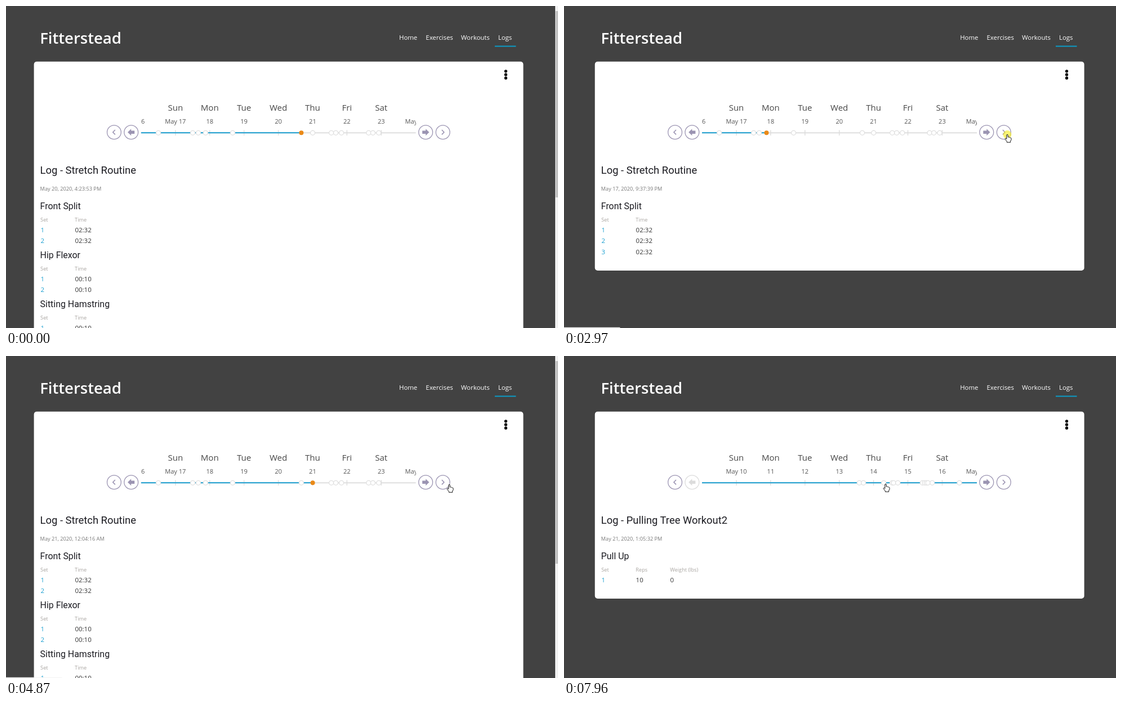
An HTML page that plays this animation: 980 by 572 pixels, repeating every 8 s.

```html
<!DOCTYPE html>
<html lang="en">
<head>
<meta charset="utf-8">
<title>Workout logs</title>
<style>
html, body { margin: 0; width: 100%; height: 100%; overflow: hidden; background: #424242; }
svg { display: block; width: 980px; height: 572px; }
text { font: 11.5px "Open Sans", "Noto Sans", sans-serif; fill: #333; }
.brand { font-size: 27.5px; font-weight: 600; fill: #fff; }
.nav { font-size: 11.4px; font-weight: 500; fill: #fff; }
.day { font-size: 15px; fill: #484848; text-anchor: middle; }
.date { font-size: 11px; fill: #555; text-anchor: middle; }
.title { font: 18.4px Roboto, sans-serif; fill: #1c1c22; }
.exercise { font: 15.9px Roboto, sans-serif; fill: #1c1c22; }
.stamp { font-size: 9.2px; fill: #777; }
.head { font-size: 9.2px; fill: #a8a4a0; }
.set { fill: #1b9fd0; }
</style>
</head>
<body>
<svg viewBox="0 0 980 572">
  <defs><clipPath id="window"><rect x="245" y="190" width="488" height="50"/></clipPath></defs>
  <rect width="980" height="572" fill="#424242"/>
  <g id="page">
    <rect id="card" x="54.8" y="98.75" width="868.8" rx="5" fill="#fff"/>
    <text class="brand" x="65.4" y="67">Fitterstead</text>
    <g id="nav"></g>
    <rect x="873" y="70.5" width="37.5" height="2" fill="#0b9cc8"/>
    <g id="kebab"></g>
    <g id="days"></g>
    <g clip-path="url(#window)">
      <rect x="245" y="224.3" width="488" height="2" fill="#dfdfdf"/>
      <g id="ticks"></g>
      <g id="strip">
        <rect id="fill" x="-300" y="224.2" height="2" fill="#1b9fd0"/>
      </g>
    </g>
    <g id="buttons"></g>
    <g id="logs"></g>
  </g>
  <g id="scrollbar">
    <rect x="975" width="5" height="572" fill="#f1f1f1"/>
    <rect id="thumb" x="975.6" y="9" width="5" fill="#c1c1c1"/>
  </g>
  <rect id="status" y="570.8" width="99.5" height="1.2" fill="#f4f4f4"/>
  <circle id="click" r="7.4" fill="#f5ec2a" opacity=".65"/>
  <g id="cursor" stroke="#111" fill="#fff" stroke-linejoin="round">
    <path id="arrow" stroke-width=".8" d="M0 0V12L2.8 9.5L4.6 13.7L6.5 12.9L4.7 8.8H8.4Z"/>
    <path id="hand" stroke-width="1" d="M-1.2 1Q0-.4 1.2 1V5Q2.6 4.3 3.4 5.4Q4.8 4.9 5.4 6Q6.9 5.8 7 7.3V9.6L5.6 12.2V14.2H-.7V12.7L-3.9 8.6Q-3.9 6.8-2.4 7.3L-1.2 8.4Z"/>
  </g>
</svg>
<script>
const LOOP = 8000, DAY = 60.9, SUNDAY = 306, NARROW_SHIFT = -5.2;
const $ = id => document.getElementById(id);

function add(parent, tag, attrs, content = '') {
  const el = document.createElementNS('http://www.w3.org/2000/svg', tag);
  for (const key in attrs) el.setAttribute(key, attrs[key]);
  el.textContent = content;
  parent.append(el);
  return el;
}
const label = (parent, cls, x, y, content) => add(parent, 'text', { class: cls, x, y }, content);
const show = (el, on) => el.setAttribute('visibility', on ? 'visible' : 'hidden');
const move = (el, x, y = 0) => el.setAttribute('transform', `translate(${x} ${y})`);

// Fixed page furniture
[['Home', 703.2], ['Exercises', 750.5], ['Workouts', 813], ['Logs', 879]]
  .forEach(([name, x]) => label($('nav'), 'nav', x, 60, name));
[115.8, 121.9, 128].forEach(cy => add($('kebab'), 'circle', { cx: 892.5, cy, r: 2.65 }));
['Sun', 'Mon', 'Tue', 'Wed', 'Thu', 'Fri', 'Sat'].forEach((name, i) => {
  const x = SUNDAY + i * DAY;
  label($('days'), 'day', x, 185.5, name);
  add($('ticks'), 'rect', { x: x - .7, y: 220.5, width: 1.4, height: 9.5, fill: '#dcdcdc' });
});

function button(x, flip, fat) {
  const g = add($('buttons'), 'g', { transform: `translate(${x} 224.2) scale(${flip} 1)`, stroke: '#9b94b2', fill: '#9b94b2' });
  add(g, 'circle', { r: 12.4, fill: 'none', 'stroke-width': 1.3 });
  add(g, 'path', fat
    ? { d: 'M-6.2 0L0-6V-2.8H6V2.8H0V6Z', stroke: 'none' }
    : { d: 'M1.9-4.2L-2.1 0L1.9 4.2', fill: 'none', 'stroke-width': 1.6 });
  return g;
}
button(197.1, 1, false);
const previous = button(227.4, 1, true);
button(750.3, -1, true);
button(780.8, -1, false);

// Sliding strip of dates and log dots
for (let d = 10; d <= 24; d++)
  label($('strip'), 'date', SUNDAY + (d - 17) * DAY, 209, d % 7 === 3 ? 'May ' + d : d);
const recent = [275.7, 336.7, 346.6, 359.5, 407.6, 529.5, 549.7, 582.7, 590.7, 600.7, 649, 656.6, 667];
const older = [98, 105.3, 141.3, 156.4, 158.8, 166.4, 210, 213.8, 217, 219.8, 227.4];
const [, dots] = [older, recent].map(list =>
  list.map(cx => add($('strip'), 'circle', { cx, cy: 225.3, r: 4, fill: '#fff', stroke: '#dfdfdf', 'stroke-width': 1.3 })));

// Log panels
const timed = (name, time, count) => ({ name, heads: ['Time'], rows: Array(count).fill([time]) });
const pullUp = { name: 'Pull Up', heads: ['Reps', 'Weight (lbs)'], rows: [['10', '0']] };
const stretch = [timed('Front Split', '02:32', 2), timed('Hip Flexor', '00:10', 2), timed('Sitting Hamstring', '00:10', 2)];

function makeLog(name, stamp, exercises, thumb = 0) {
  const g = add($('logs'), 'g', {});
  label(g, 'title', 65.8, 298.3, 'Log - ' + name);
  label(g, 'stamp', 65.8, 327.5, stamp);
  let y = 355.3;
  for (const { name, heads, rows } of exercises) {
    label(g, 'exercise', 65.8, y + 5.8, name);
    ['Set', ...heads].forEach((h, i) => label(g, 'head', 66.3 + i * 61, y + 27.7, h));
    rows.forEach((row, r) => [r + 1, ...row].forEach((v, i) =>
      label(g, i ? 'value' : 'set', 66.6 + i * 61, y + 46.6 + r * 19.5, v)));
    y += 48 + rows.length * 19.5;
  }
  return { g, thumb, bottom: thumb ? 600 : y + 8.2 };
}
const splitLog = makeLog('Stretch Routine', 'May 17, 2020, 9:37:39 PM', [timed('Front Split', '02:32', 3)]);
const mondayLog = makeLog('Pulling Tree Workout2', 'May 18, 2020, 3:58:21 PM', [pullUp]);
const stretchLog = makeLog('Stretch Routine', 'May 20, 2020, 4:23:53 PM', stretch, 331);
const nightLog = makeLog('Stretch Routine', 'May 21, 2020, 12:04:16 AM', stretch, 360);
const pullLog = makeLog('Pulling Tree Workout2', 'May 21, 2020, 1:05:32 PM', [pullUp]);
const logs = [splitLog, mondayLog, stretchLog, nightLog, pullLog];

// [start, selected dot, log]
const selections = [
  [-1000, 5, stretchLog], [1630, 3, splitLog], [3110, 4, mondayLog],
  [3820, 5, stretchLog], [4530, 6, nightLog], [5245, 7, pullLog]
];
const clicks = [[1480, 1560], [2890, 3120], [3680, 3840], [4390, 4550], [5180, 5260], [6440, 6520]];
const statusTimes = [[2890, 5600], [6050, 6800]];
const handTimes = [[1000, 1760], [2650, 5430], [6010, 6760], [6960, 7060], [7240, LOOP]];
// [time, x, y]
const path = [
  [140, 757, 518], [920, 362, 233], [1000, 361, 229], [1160, 359, 228], [1320, 358, 227], [1720, 358, 227],
  [2340, 676, 258], [2730, 787, 228], [5380, 787, 228], [5970, 226, 236], [6120, 210, 227], [6280, 220, 227],
  [6680, 220, 227], [7000, 776, 226], [7240, 562, 228], [7400, 579, 228], [7640, 557, 228], [7800, 570, 228], [7960, 571, 227]
];

const within = (ranges, t) => ranges.some(([a, b]) => t >= a && t < b);
const mix = (a, b, p) => a + (b - a) * p;
const easeOut = p => 1 - (1 - Math.min(1, Math.max(0, p))) ** 2.2;

function along(t) {
  const i = path.findIndex(k => k[0] > t);
  if (i < 1) return path[i < 0 ? path.length - 1 : 0];
  const [a, b] = [path[i - 1], path[i]];
  const p = (t - a[0]) / (b[0] - a[0]), s = p * p * (3 - 2 * p);
  return [t, mix(a[1], b[1], s), mix(a[2], b[2], s)];
}

// The outline thins away as the dot fills with orange
function tint(dot, amount) {
  const rgb = [234, 138, 24].map(c => Math.round(mix(255, c, amount)));
  dot.setAttribute('fill', `rgb(${rgb})`);
  dot.setAttribute('stroke-width', 1.3 * (1 - amount));
}

function draw(t) {
  const index = selections.findLastIndex(s => t >= s[0]);
  const [start, active, log] = selections[index];
  const old = selections[Math.max(0, index - 1)][1];
  const e = easeOut((t - start) / 300);

  logs.forEach(l => show(l.g, l === log));
  $('card').setAttribute('height', log.bottom - 98.75);
  move($('page'), log.thumb ? NARROW_SHIFT : 0);
  show($('scrollbar'), log.thumb > 0);
  $('thumb').setAttribute('height', log.thumb);

  dots.forEach((dot, i) => tint(dot, i === active ? (old === active ? 1 : e) : i === old ? 1 - e : 0));
  $('fill').setAttribute('width', 300 + mix(recent[old], recent[active], e));
  move($('strip'), 7 * DAY * easeOut((t - 6529) / 400));
  const ink = t >= 6490 ? '#dcdcdc' : '#9b94b2';
  previous.setAttribute('stroke', ink);
  previous.setAttribute('fill', ink);

  const [, x, y] = along(t), isHand = within(handTimes, t), seen = t >= 140;
  move($('cursor'), x, y);
  show($('hand'), seen && isHand);
  show($('arrow'), seen && !isHand);
  move($('click'), x, y + .5);
  show($('click'), within(clicks, t));
  show($('status'), within(statusTimes, t));
}

const origin = performance.now();
function tick() {
  draw((performance.now() - origin) % LOOP);
  requestAnimationFrame(tick);
}
tick();
</script>
</body>
</html>
```
